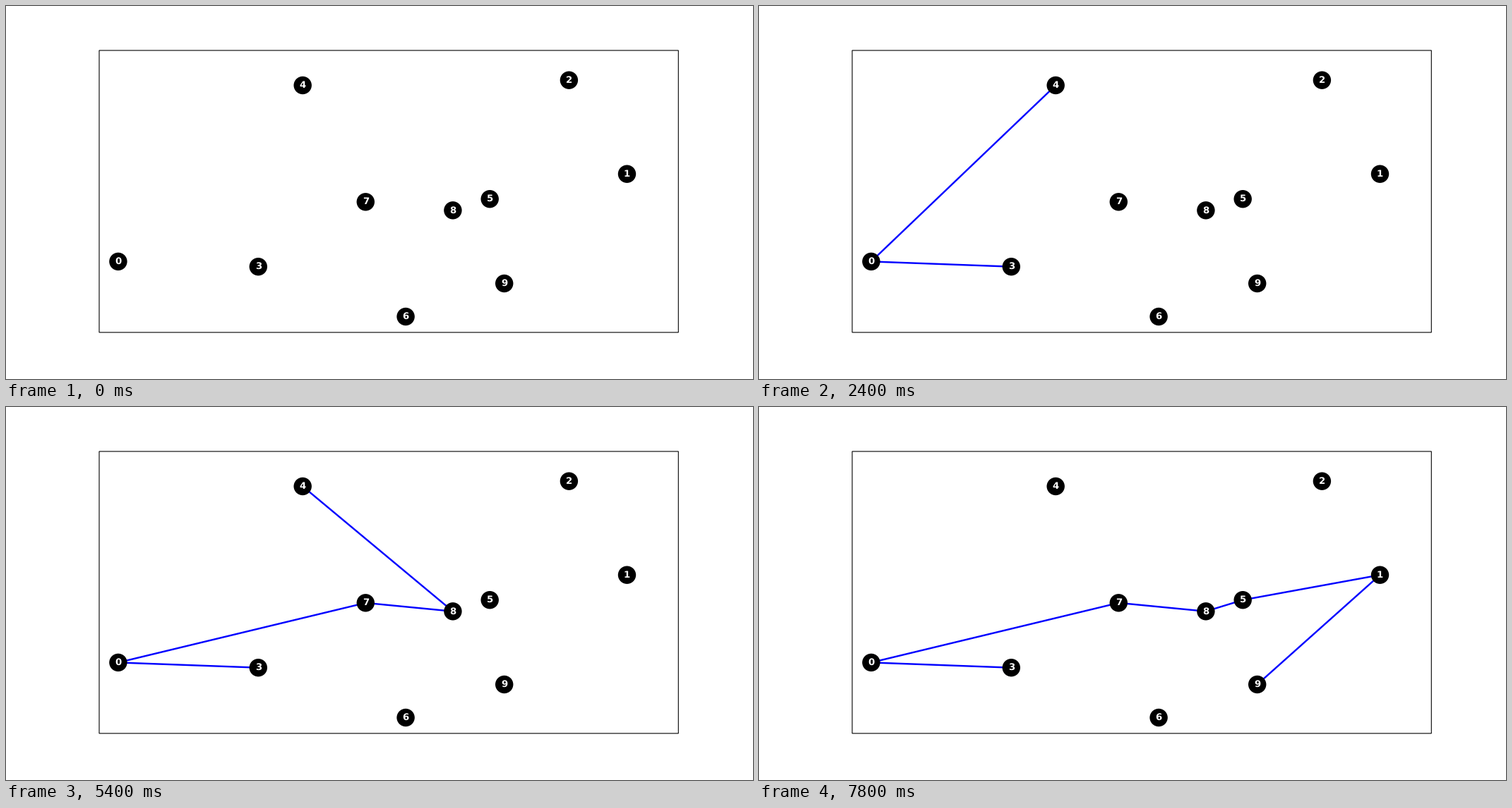
Recreate the animation shown at these times as a matplotlib script. Size 1058 by 529 pixels, loop 8 s.

```python
import itertools
import math

import matplotlib.pyplot as plt
from matplotlib.animation import FuncAnimation
from matplotlib.patches import Circle, Rectangle

W, H, DPI = 1058, 529, 100
FRAMES, INTERVAL = 40, 200
START = 3

# City centres in pixels, measured from the top left.
CITIES = [(158.9, 362.4), (879.5, 238.2), (797.4, 105.2), (357.3, 369.7),
          (420.2, 112.5), (685.2, 273.7), (566.1, 440.5), (509.3, 277.8),
          (632.9, 289.8), (705.7, 393.5)]


def distance(a, b):
    """Distance on the map, which is drawn twice as wide as it is tall."""
    (xa, ya), (xb, yb) = CITIES[a], CITIES[b]
    return math.hypot((xa - xb) / 2, ya - yb)


def search_steps():
    """Nearest-neighbour search: yield the tour with every candidate tried."""
    yield []
    tour = [START]
    while len(tour) < len(CITIES):
        candidates = [c for c in range(len(CITIES)) if c not in tour]
        for city in candidates:
            yield tour + [city]
        tour.append(min(candidates, key=lambda c: distance(tour[-1], c)))


steps = list(itertools.islice(search_steps(), FRAMES))

plt.rcParams["text.hinting"] = "none"
fig = plt.figure(figsize=(W / DPI, H / DPI), dpi=DPI, facecolor="white")
ax = fig.add_axes([0, 0, 1, 1], xlim=(0, W), ylim=(H, 0))
ax.axis("off")

# Smooth, unsnapped outlines keep fractional pixel positions.
ax.add_patch(Rectangle((132, 63), 820.3, 399.9, fill=False,
                       edgecolor="black", linewidth=0.8, snap=False))
for number, (x, y) in enumerate(CITIES):
    ax.add_patch(Circle((x, y), 12.7, color="black", linewidth=0, zorder=3))
    ax.text(x, y, str(number), color="white", fontsize=9.5, fontweight="bold",
            family="DejaVu Sans", ha="center", va="center", zorder=4)

edges = [ax.plot([], [], color="blue", linewidth=1.75, zorder=2)[0]
         for _ in range(len(CITIES) - 1)]


def draw(frame):
    legs = itertools.pairwise(steps[frame])
    for edge, leg in itertools.zip_longest(edges, legs, fillvalue=()):
        points = [CITIES[c] for c in leg]
        edge.set_data([p[0] for p in points], [p[1] for p in points])
    return edges


anim = FuncAnimation(fig, draw, frames=FRAMES, interval=INTERVAL,
                     repeat=True, repeat_delay=0)
plt.show()
```
